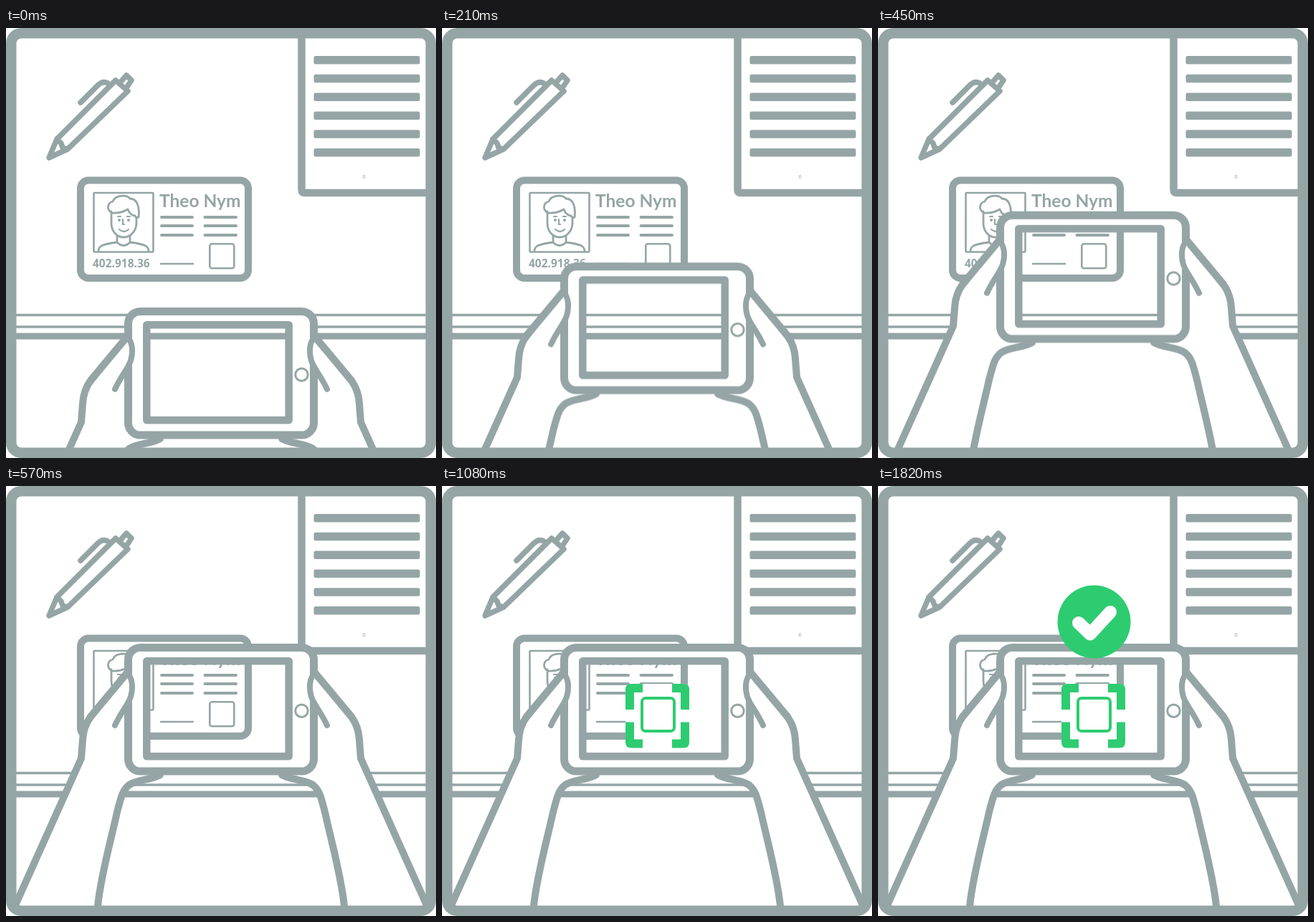
An HTML page that plays this animation: 600 by 600 pixels, repeating every 2720 ms.

```html
<!DOCTYPE html>
<html lang="en">
<head>
<meta charset="utf-8">
<title>Scanning a card</title>
<style>
  html, body { margin: 0; width: 100%; height: 100%; overflow: hidden; background: #fff; }
  svg { display: block; width: 100vw; height: 100vh; --ink: #95a5a6; --go: #2ecc71; }
  .line { fill: none; stroke: var(--ink); stroke-linecap: round; stroke-linejoin: round; }
  .paper { fill: #fff; }
  text { fill: var(--ink); }
  .name { font: bold 24.5px Lato, sans-serif; }
  .number { font: bold 15.5px "Open Sans", sans-serif; }
  .page { font: 8px "Open Sans", sans-serif; text-anchor: middle; }

  #device, #scan, #done { animation: 2720ms infinite step-end; }
  #device { animation-name: rise; }
  #scan { animation-name: scan; }
  #done { animation-name: done; }

  @keyframes rise {
    0% { transform: translateY(170px); animation-timing-function: steps(19, end); }
    20.955%, 100% { transform: translateY(0); }
  }
  @keyframes scan {
    0% { opacity: 0; }
    34.19% { opacity: .2; animation-timing-function: steps(5, end); }
    39.705%, 100% { opacity: 1; }
  }
  @keyframes done {
    0% { opacity: 0; }
    50.367% { opacity: .15; animation-timing-function: steps(15, end); }
    66.91%, 100% { opacity: 1; }
  }
</style>
</head>
<body>
<svg viewBox="0 0 600 600">
  <defs>
    <clipPath id="inside"><rect x="7" y="7" width="586" height="586" rx="14"/></clipPath>

    <g id="arm">
      <path class="paper" d="M168 262L118 322Q108 336 107 354L105 380L-40 703H118L128 586
        C132 545 147 492 155 455C161 432 163 424 172 417C184 409 200 411 215 403L175 390V300Z"/>
      <path class="line" stroke-width="10" d="M168 262L118 322Q108 336 107 354L105 380L-40 703
        M118 703L128 586C132 545 147 492 155 455C161 432 163 424 172 417C184 409 200 411 215 403"/>
    </g>

    <g id="thumb">
      <path class="paper" d="M168 262C178 270 177 284 174 294C170 306 162 313 152 334L125 322Z"/>
      <path class="line" stroke-width="8" d="M168 260C178 268 177 284 174 294C170 306 162 313 152 334"/>
      <path class="line" stroke-width="10" d="M168 262L118 322"/>
    </g>

    <path id="corner" d="M256 312V284Q256 276 264 276H280V288H268V312Z"/>
  </defs>

  <rect class="paper" width="600" height="600"/>

  <g clip-path="url(#inside)">
    <!-- desk edge -->
    <path class="line" stroke-width="3.5" d="M10 400.5H590M10 417H590"/>
    <path class="line" stroke-width="9" d="M10 430H590"/>

    <!-- document -->
    <path class="line" stroke-width="10.5" d="M412.5 8V226Q412.5 230 416.5 230H590"/>
    <path class="line" stroke-width="11" d="M432.5 45H574.5M432.5 70.7H574.5M432.5 96.5H574.5
      M432.5 122.3H574.5M432.5 148H574.5M432.5 174H574.5" style="stroke-linecap:square" transform="translate(50.35) scale(.9 1)" visibility="hidden"/>
    <g fill="var(--ink)">
      <rect id="row" x="429.5" y="39" width="148" height="11.5" rx="2.5"/>
      <use href="#row" y="25.8"/>
      <use href="#row" y="51.6"/>
      <use href="#row" y="77.4"/>
      <use href="#row" y="103.2"/>
      <use href="#row" y="129"/>
    </g>
    <text class="page" x="499.5" y="210">6</text>

    <!-- pen -->
    <path class="line" stroke-width="7.5" d="M60 181L71 155L153 73L170 88L86 169ZM71 155L77 161L79 167L86 169
      M161 74L168 66L175 73L169 82M104 104L128 80Q135 73 142 77"/>

    <!-- card -->
    <rect class="line" stroke-width="10" x="104" y="212.5" width="234" height="136.5" rx="11"/>
    <rect class="line" stroke-width="2.6" x="122.5" y="230" width="83" height="82.5" rx="1"/>
    <g class="line" stroke-width="2.8">
      <path d="M147 256V272C147 284 155 292 164 292C174 292 182 283 182 272V264"/>
      <path d="M148 258C140 254 141 244 149 242C152 233 168 232 173 238C182 238 187 248 185 264
        Q181 266 180 262Q173 261 170 253Q160 259 148 258Z"/>
      <path d="M155 290V299Q139 301 133 304Q129 307 129 311M173 290V299Q189 301 195 304Q199 307 199 311
        M155 299Q164 308 173 299"/>
      <path stroke-width="2.2" d="M163 267V274H165M158 281Q165 287 171 281M156 263H160M169 263H173"/>
    </g>
    <g fill="var(--ink)"><circle cx="158" cy="268" r="2"/><circle cx="171" cy="268" r="2"/></g>
    <text class="name" x="214" y="250">Theo Nym</text>
    <text class="number" x="121" y="333.5">402.918.36</text>
    <path class="line" stroke-width="4" d="M217 264H260M217 276H260M217 289H260
      M277.500 264H321M277.500 276H321M277.500 289H321"/>
    <path class="line" stroke-width="2.4" d="M216 329H261"/>
    <rect class="line" stroke-width="2.6" x="284.300" y="301.300" width="34" height="34" rx="3"/>

    <!-- hands and tablet -->
    <g id="device">
      <use href="#arm"/>
      <use href="#arm" transform="translate(600) scale(-1 1)"/>
      <path class="paper" fill-rule="evenodd" d="M188 225.500H412Q429.500 225.500 429.500 243V380.500
        Q429.500 398 412 398H188Q170.500 398 170.500 380.500V243Q170.500 225.500 188 225.500ZM196 244V377H395V244Z"/>
      <rect class="line" stroke-width="11" x="170.500" y="225.500" width="259" height="172.500" rx="17"/>
      <rect class="line" stroke-width="10.500" x="196.300" y="244.300" width="198.400" height="133"/>
      <circle class="line" stroke-width="3" cx="412.500" cy="313.700" r="8.700"/>
      <use href="#thumb"/>
      <use href="#thumb" transform="translate(600) scale(-1 1)"/>
    </g>
  </g>

  <rect class="line" stroke-width="14.500" x="7.250" y="7.250" width="585.500" height="585.500" rx="14"/>

  <g id="scan" fill="var(--go)">
    <rect class="paper" x="256" y="276" width="89" height="89.500" rx="8"/>
    <use href="#corner"/>
    <use href="#corner" transform="translate(601) scale(-1 1)"/>
    <use href="#corner" transform="translate(0 641.500) scale(1 -1)"/>
    <use href="#corner" transform="translate(601 641.500) scale(-1)"/>
    <rect fill="none" stroke="var(--go)" stroke-width="4" x="279" y="296" width="45" height="46" rx="5"/>
  </g>

  <g id="done">
    <circle cx="301.500" cy="189.500" r="51" fill="var(--go)"/>
    <path d="M280 191L296 206.500L324 176" fill="none" stroke="#fff" stroke-width="18"
      stroke-linecap="round" stroke-linejoin="round"/>
  </g>
</svg>
</body>
</html>
```
